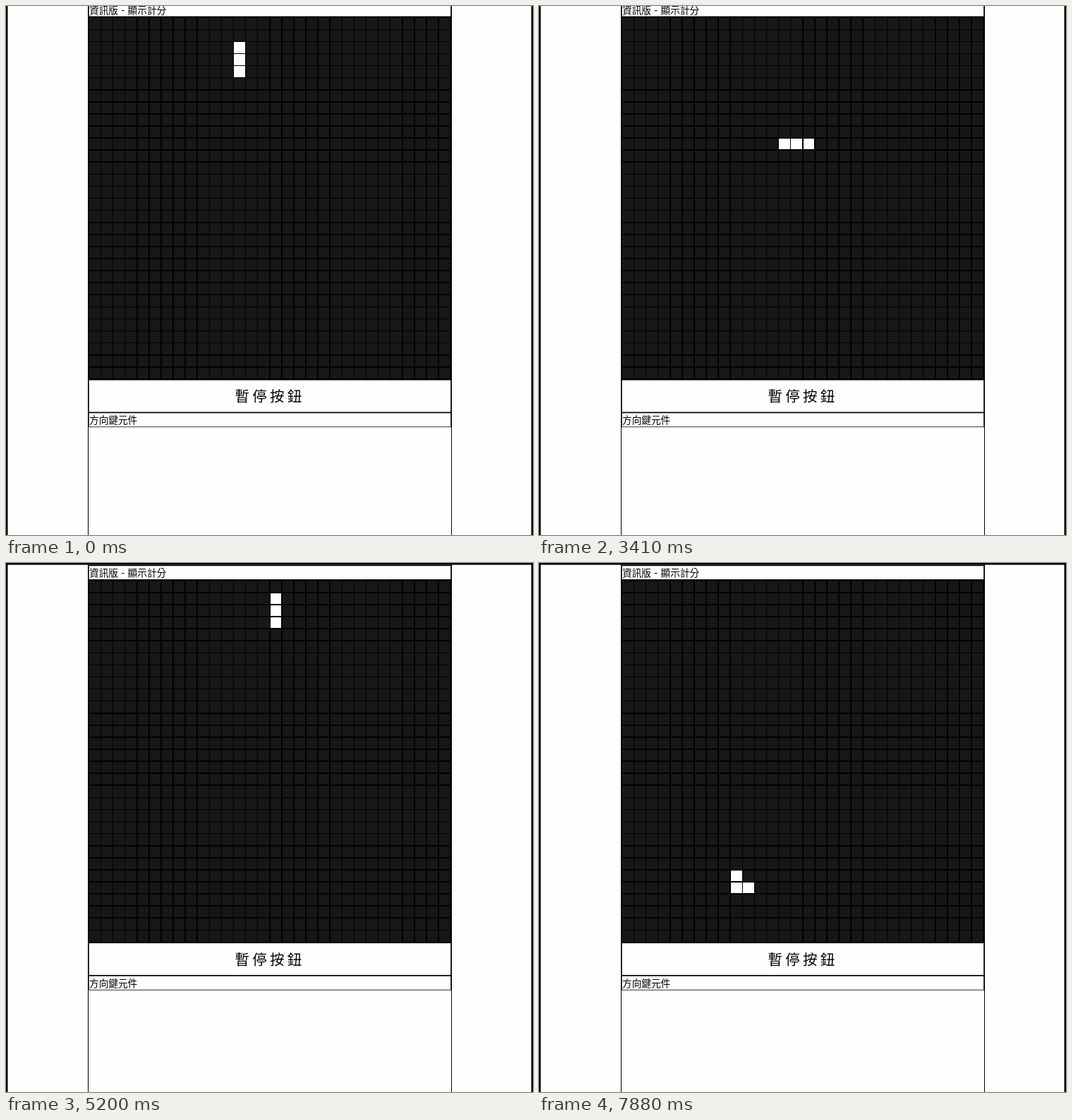
Write an HTML page that moves like this. It is 747 px wide and 750 px high and loops after 8000 ms.

```html
<!DOCTYPE html>
<html lang="zh-Hant">
<head>
<meta charset="utf-8">
<title>Snake</title>
<style>
  html, body { margin: 0; width: 100%; height: 100%; overflow: hidden; background: #fefefe; }
  svg { display: block; width: 747px; height: 750px; }
  text { font-family: 'DejaVu Sans', 'Noto Sans CJK TC', 'Noto Sans CJK', sans-serif; font-size: 13.67px; }
  .pause { font-family: 'Noto Sans CJK TC', 'Noto Sans CJK', sans-serif; font-size: 20.5px; letter-spacing: 4.27px; }
  .box { fill: #fefefe; }
</style>
</head>
<body>
<svg viewBox="0 0 747 750">
  <rect width="747" height="750" fill="#fefefe"/>
  <path d="M116 0h1v750h-1zM631 0h1v750h-1z" shape-rendering="crispEdges"/>
  <g id="page">
    <rect width="747" height="2.56"/>
    <rect x="116" y="2.5" width="516" height="603.2"/>
    <rect class="box" x="117.7" y="4.2" width="512.5" height="18.9"/>
    <rect class="box" x="117.7" y="539.1" width="512.5" height="45"/>
    <rect class="box" x="117.7" y="585.8" width="512.5" height="19.1"/>
    <text x="118" y="19.2">資訊版 - 顯示計分</text>
    <text class="pause" x="324.4" y="569.6">暫停按鈕</text>
    <text x="118" y="600.7">方向鍵元件</text>
  </g>
  <path id="grid" fill="#171717" shape-rendering="crispEdges"/>
  <path id="snake" fill="#fff" shape-rendering="crispEdges"/>
  <path d="M0 0h2.5v750h-2.5zM744.5 0h2.5v750h-2.5z"/>
  <rect id="thumb" x="740" width="6" height="750"/>
</svg>
<script>
const LOOP = 8000, PITCH = 17.09, CELL = 15.5, COLS = 30, SCROLL_AT = 3560;
const $ = id => document.getElementById(id);

// first step, last step, headings between them
const runs = [
  [140, 140, 'D'], [440, 730, 'DLL'], [1030, 1330, 'LLD'], [1620, 1920, 'DDD'],
  [2220, 2520, 'RRR'], [2810, 3110, 'RRR'], [3410, 3710, 'RUU'], [4010, 4310, 'UUU'],
  [4610, 4900, 'UUU'], [5200, 5500, 'UUU'], [5800, 6100, 'UUU'], [6400, 6690, 'LLL'],
  [6990, 7140, 'UU'], [7440, 7880, 'LLLU']
];
const dirs = { U: [0, -1], D: [0, 1], L: [-1, 0], R: [1, 0] };

const trail = [[12, 2], [12, 3], [12, 4]];
const times = [];
for (const [start, end, moves] of runs) {
  [...moves].forEach((m, i) => {
    const [x, y] = trail[trail.length - 1];
    const [dx, dy] = dirs[m];
    // one hidden row lies beyond the board before it wraps
    trail.push([x + dx, (y + dy + COLS + 1) % (COLS + 1)]);
    times.push(start + (moves.length > 1 ? (end - start) * i / (moves.length - 1) : 0));
  });
}

function cellPath(col, row, top) {
  if (row >= COLS) return '';
  const x = 118.2 + col * PITCH, y = top + row * PITCH;
  const l = Math.round(x), t = Math.round(y);
  return `M${l} ${t}H${Math.round(x + CELL)}V${Math.round(y + CELL)}H${l}z`;
}

function drawGrid(top) {
  let d = '';
  for (let r = 0; r < COLS; r++)
    for (let c = 0; c < COLS; c++) d += cellPath(c, r, top);
  $('grid').setAttribute('d', d);
}

function thumbAlpha(t) {
  if (t < SCROLL_AT || t >= 4160) return 0;
  return t < 4010 ? 0.5 : 0.25;
}

let lastTop;
function render(t) {
  const scrolled = t < SCROLL_AT;
  const top = scrolled ? 17 : 25.55;
  if (top !== lastTop) {
    drawGrid(top);
    $('page').setAttribute('transform', `translate(0 ${scrolled ? -8.55 : 0})`);
    lastTop = top;
  }
  const n = times.filter(s => s <= t).length;
  $('snake').setAttribute('d', trail.slice(n, n + 3).map(([c, r]) => cellPath(c, r, top)).join(''));
  $('thumb').setAttribute('opacity', thumbAlpha(t));
}

const begin = performance.now();
function tick() {
  render((performance.now() - begin) % LOOP);
  requestAnimationFrame(tick);
}
tick();
</script>
</body>
</html>
```
